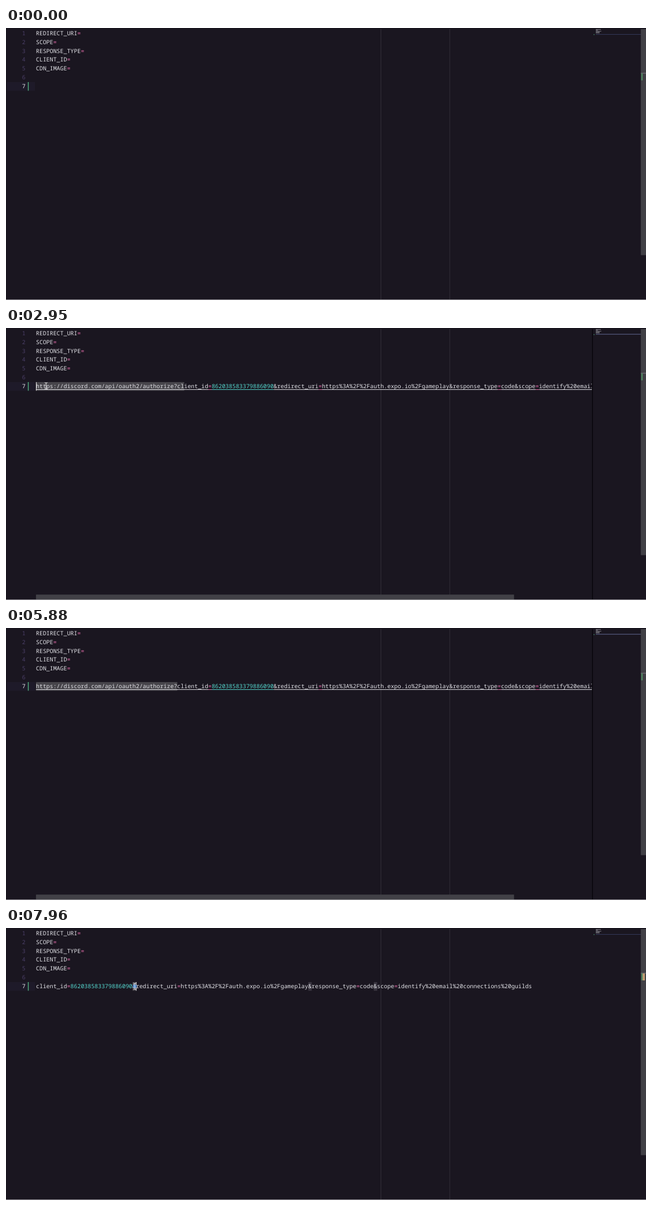
Animation of 1148 by 488 pixels, one loop 8 s. Source, as an HTML page:

```html
<!DOCTYPE html>
<html lang="en">
<head>
<meta charset="utf-8">
<title>Editor</title>
<style>
  html, body { margin: 0; width: 100%; height: 100%; overflow: hidden; background: #1a1620; }
  svg { display: block; width: 1148px; height: 488px; }
  text { font: 10.305px "Noto Sans Mono", "DejaVu Sans Mono", monospace; white-space: pre;
         text-rendering: geometricPrecision; font-variant-ligatures: none; }
</style>
</head>
<body>
<svg id="stage" viewBox="0 0 1148 488"></svg>
<script>
const LOOP = 8000, LEFT = 53.8, CHAR = 6.183, ROW = 15.8, SCROLL = 156.3;
const WHITE = '#e1e1e6', PINK = '#ea6fae', CYAN = '#55d6cd', DIM = '#4a3f66';
const HOST = 'https://discord.com/api/oauth2/authorize?';
const QUERY = 'client_id=862038583379886090&redirect_uri=https%3A%2F%2Fauth.expo.io%2Fgameplay' +
  '&response_type=code&scope=identify%20email%20connections%20guilds';
const KEYS = ['REDIRECT_URI', 'SCOPE', 'RESPONSE_TYPE', 'CLIENT_ID', 'CDN_IMAGE'];
const END = (HOST + QUERY).length;

const stage = document.getElementById('stage');
const col = n => LEFT + n * CHAR;
const baseline = row => 13 + row * ROW;
const escape = s => s.replace(/&/g, '&amp;');

// Split a line into coloured runs: equals signs, long numbers, everything else.
const runs = line => line.split(/(=|\d{18})/).filter(Boolean)
  .map(s => ({ s, fill: s === '=' ? PINK : /^\d{18}$/.test(s) ? CYAN : WHITE }));

const rect = (x, y, w, h, fill, more = '') =>
  `<rect x="${x}" y="${y}" width="${w}" height="${h}" fill="${fill}" ${more}/>`;

const text = (line, row) => `<text x="${LEFT}" y="${baseline(row)}">` +
  runs(line).map(r => `<tspan fill="${r.fill}">${escape(r.s)}</tspan>`).join('') + '</text>';

function underline(line) {
  let n = 0;
  return runs(line).map(r => {
    const part = rect(col(n), 110, r.s.length * CHAR, 1, r.fill);
    n += r.s.length;
    return part;
  }).join('');
}

const link = (id, line) => `<g id="${id}">${text(line, 6)}<g id="${id}Line">${underline(line)}</g></g>`;

const numbers = Array.from({ length: 7 }, (_, i) =>
  `<text x="35" y="${baseline(i)}" text-anchor="end" fill="${i === 6 ? WHITE : DIM}">${i + 1}</text>`).join('');

const minimap = KEYS.map((k, i) =>
  rect(1058, 2 + i * 1.6, k.length * 0.75, 1, '#aaa8b0', 'opacity=".75"')).join('');

stage.innerHTML = `
  <defs><clipPath id="pane">${rect(53, 0, 999, 488, '#fff')}</clipPath></defs>
  ${rect(0, 0, 1148, 488, '#1a1620')}
  ${rect(0, 0, 1148, 1, '#15121b')}${rect(0, 0, 1, 488, '#15121b')}
  ${rect(2, 97, 50, 15.5, '#1e1a29')}
  ${numbers}
  ${rect(39, 97, 2, 15.5, '#418765')}
  <g clip-path="url(#pane)"><g id="view">
    ${rect(672, 2, 1, 486, '#322f39')}${rect(795.5, 2, 1, 486, '#322f39')}
    <g id="marks"></g>
    ${KEYS.map((k, i) => text(k + '=', i)).join('')}
    ${link('full', HOST + QUERY)}
    ${link('short', QUERY)}
    ${rect(0, 97, 1, 15.5, '#f4f4f6', 'id="caret"')}
  </g></g>
  ${rect(1051, 2, 2, 486, '#0b090f', 'id="edge"')}
  ${minimap}
  ${rect(1054, 11, 1.5, 1.5, '#418765')}
  ${rect(1058, 11, 81, 1, '#34395a')}
  ${rect(1058, 10.5, 81, 1.5, '#4a4e6e', 'id="mapLine"')}
  ${rect(LEFT, 478.3, 857, 9.7, '#414046', 'id="bar"')}
  ${rect(1138.7, 2, 9.3, 405.5, '#414046')}
  ${rect(1138.7, 80.5, 9.3, 1.2, '#77757c')}
  ${rect(1139.5, 81.5, 2.5, 12.5, '#4f8860')}
  ${rect(1142, 81.5, 4, 12.5, '#c09a72', 'id="found"')}
  ${rect(0, 487, 1148, 1, '#9a999e')}
  <g id="mouse">
    <circle id="press" r="5" fill="#3c86d8" opacity=".85"/>
    <path id="beam" d="M-2.5-5.5H-1L0-4.8 1-5.5H2.5M0-4.8V5M-2.5 5.7H-1L0 5 1 5.7H2.5" fill="none"/>
  </g>`;

const el = {};
stage.querySelectorAll('[id]').forEach(n => el[n.id] = n);
el.beam.setAttribute('stroke', '#f0f0f0');

const set = (node, attrs) => { for (const k in attrs) node.setAttribute(k, attrs[k]); };
const show = (node, on) => node.setAttribute('visibility', on ? 'inherit' : 'hidden');
const within = (t, a, b) => t >= a && t < b;
const clamp = v => Math.max(0, Math.min(1, v));

// Linear track through [time, value] points.
function track(points, t) {
  let [t0, v0] = points[0];
  for (const [t1, v1] of points) {
    if (t < t1) return v0 + (v1 - v0) * clamp((t - t0) / (t1 - t0));
    [t0, v0] = [t1, v1];
  }
  return v0;
}

const mouseX = [[2360, 163], [2470, 58], [2550, 45], [2880, 48], [3070, 112], [3200, 122], [3400, 160],
  [3630, 274], [3970, 328], [4010, 327], [4200, 307], [4340, 307], [4900, 306], [4960, 304.5],
  [5120, 34], [5300, -6], [6440, 0], [6560, 18], [7180, 216], [7250, 222], [7650, 228], [7960, 231]];
const mouseY = [[2360, 104], [2470, 103], [3200, 104], [3630, 106.5], [4010, 109], [4200, 107], [4960, 105],
  [6440, 108], [7180, 107], [7960, 104.5]];

// Selection as [from, to, caret] in columns.
function selection(t, mouse, scroll) {
  const at = Math.max(0, Math.round((mouse + scroll - LEFT) / CHAR));
  const dragLeft = (from, anchor) => [Math.min(from, anchor), anchor, Math.min(from, anchor)];
  if (t < 400) return [0, 0, 0];
  if (t < 2360) return [END, END, END];
  if (t < 2470) return dragLeft(at, 43);
  if (t < 2530) return dragLeft(32, 43);
  if (t < 3200) return dragLeft(t < 2900 ? at : 0, 43);
  if (t < 4340) return [11, 11, 11];
  if (t < 4900) return [41, 41, 41];
  if (t < 5000) return [40, 41, 41];
  if (t < 6420) return dragLeft(at, 41);
  if (t < 7650) return [0, 0, 0];
  return t < 7860 ? [28, 28, 28] : [28, 29, 29];
}

function caretOn(t) {
  return !(t < 120 || within(t, 870, 1360) || within(t, 1860, 2360) ||
    within(t, 3700, 4200) || within(t, 5620, 5920) || within(t, 6920, 7420));
}

function highlights(t, from, to) {
  const box = (a, b, fill) => rect(col(a), 97, (b - a) * CHAR, 15.5, fill);
  let out = to > from ? box(from, to, '#47454b') : '';
  if (within(t, 3450, 4340)) out += box(8, 15, '#302d38');
  if (t >= 7860) out += box(79, 80, '#38343f') + box(98, 99, '#38343f');
  return out;
}

function draw(t) {
  const long = within(t, 400, 6420);
  const scroll = t < 400 ? 0 : track([[2500, SCROLL], [2880, 0]], t);
  const x = track(mouseX, t), y = track(mouseY, t);
  const [from, to, caret] = selection(t, x, scroll);

  el.view.setAttribute('transform', `translate(${-scroll} 0)`);
  el.marks.innerHTML = highlights(t, from, to);
  show(el.full, long);
  show(el.fullLine, t >= 1360);
  show(el.short, t >= 6420);
  show(el.shortLine, t < 7420);
  show(el.edge, long);
  show(el.mapLine, long);

  show(el.caret, caretOn(t));
  el.caret.setAttribute('x', col(caret) - (caret === END ? 0.7 : 0));

  const early = t < 810;
  set(el.bar, {
    x: LEFT + scroll / SCROLL * (early ? 130 : 133),
    width: early ? 842 : 857.5,
    opacity: early ? 0.3 + 0.7 * clamp((t - 400) / 110) : 1
  });
  show(el.bar, long);
  show(el.found, within(t, 3450, 4340) || t >= 7860);

  const drag = within(t, 2360, 2900);
  const pressed = drag || within(t, 3180, 3280) || within(t, 4880, 5300) || t >= 7820;
  show(el.mouse, within(t, 2360, 5300) || t >= 6440);
  show(el.press, pressed);
  show(el.beam, !drag);
  set(el.press, { r: drag ? 5 : 3.3 });
  el.mouse.setAttribute('transform', `translate(${x} ${y})`);
}

function tick() {
  draw(performance.now() % LOOP);
  requestAnimationFrame(tick);
}
tick();
</script>
</body>
</html>
```
